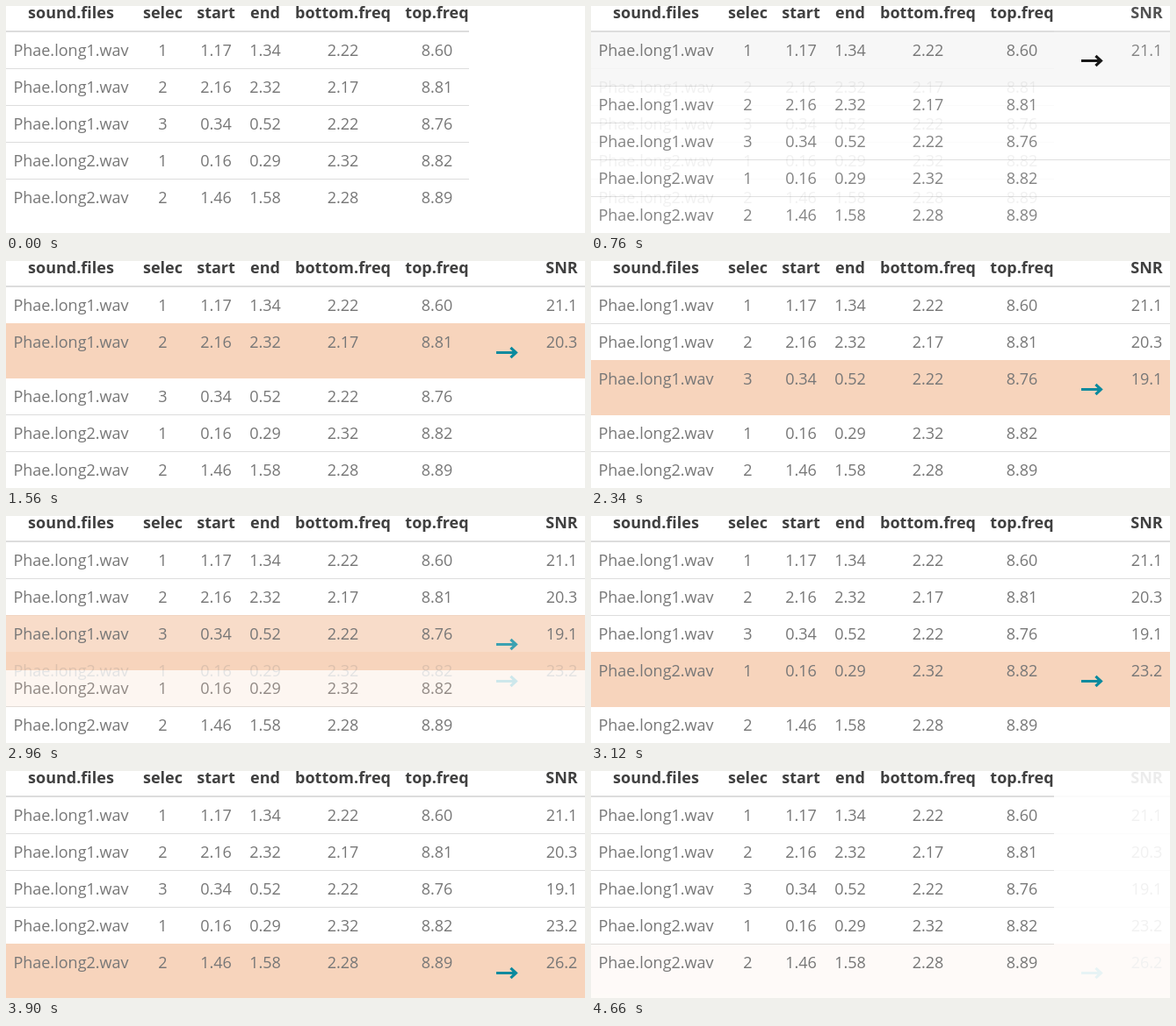
Recreate the animation shown at these times as an HTML page. Size 659 by 259 pixels, loop 4.68 s.

```html
<!DOCTYPE html>
<html lang="en">
<head>
<meta charset="utf-8">
<title>Signal-to-noise table</title>
<style>
  html, body { margin: 0; width: 100%; height: 100%; overflow: hidden; background: #fff; }
  svg { display: block; width: 659px; height: 259px; }
  text { font: 18px "Open Sans", sans-serif; fill: #777; text-anchor: middle; }
  .head { font-weight: 700; fill: #404040; }
</style>
</head>
<body>
<svg id="stage" viewBox="0 0 659 259"></svg>
<script>
const NS = "http://www.w3.org/2000/svg";
const W = 659, H = 259, NARROW = 527;
const TOP = 29, ROW = 42, EXTRA = 20;
const HOLD = 600, STEP = 20, STEPS = 10;
const SLOT = HOLD + STEP * (STEPS - 1);
const stage = document.getElementById("stage");

const columns = [74, 178.5, 239, 295, 383.5, 490.5];
const snrX = 632.5;
const heads = ["sound.files", "selec", "start", "end", "bottom.freq", "top.freq"];
const rows = [
  ["Phae.long1.wav", "1", "1.17", "1.34", "2.22", "8.60", "21.1"],
  ["Phae.long1.wav", "2", "2.16", "2.32", "2.17", "8.81", "20.3"],
  ["Phae.long1.wav", "3", "0.34", "0.52", "2.22", "8.76", "19.1"],
  ["Phae.long2.wav", "1", "0.16", "0.29", "2.32", "8.82", "23.2"],
  ["Phae.long2.wav", "2", "1.46", "1.58", "2.28", "8.89", "26.2"]
];

function add(parent, tag, attrs, content) {
  const node = document.createElementNS(NS, tag);
  for (const key in attrs) node.setAttribute(key, attrs[key]);
  if (content) node.textContent = content;
  return parent.appendChild(node);
}

function rect(parent, x, y, width, height, fill) {
  add(parent, "rect", { x, y, width, height, fill });
}

function arrow(parent, y, stroke) {
  add(parent, "path", {
    d: `M558 ${y}H580M574.4 ${y - 5.6}L580.4 ${y}L574.4 ${y + 5.6}`,
    fill: "none", stroke, "stroke-width": 3.2
  });
}

// active: 0 for the plain table, otherwise the row being measured
function buildTable(active) {
  const g = add(stage, "g", {});
  const width = active ? W : NARROW;
  const rowY = i => TOP + ROW * i + (active && i >= active ? EXTRA : 0);
  const first = active === 1;

  rect(g, 0, 0, W, H, "#fff");
  if (first) rect(g, 0, TOP, W, ROW + EXTRA, "#f7f7f7");
  rect(g, 0, 28, width, 2, "#ddd");
  for (let i = 1; i < rows.length; i++) rect(g, 0, rowY(i), width, 1, "#ddd");
  if (active > 1) rect(g, 0, rowY(active - 1), W, ROW + EXTRA + 1, "#f7d4bc");

  heads.forEach((label, c) => add(g, "text", { x: columns[c], y: 14, class: "head" }, label));
  if (active) add(g, "text", { x: snrX, y: 14, class: "head" }, "SNR");

  rows.forEach((cells, i) => {
    const y = rowY(i) + 28;
    columns.forEach((x, c) => add(g, "text", { x, y }, cells[c]));
    if (i < active) add(g, "text", { x: snrX, y }, cells[6]);
  });
  if (active) arrow(g, rowY(active - 1) + 33.5, first ? "#000" : "#0b8a9e");
  return g;
}

const layers = [0, 1, 2, 3, 4, 5, 0].map(buildTable);
const LOOP = SLOT * (layers.length - 1);

function draw(ms) {
  const t = ms % LOOP;
  const current = Math.floor(t / SLOT);
  const fade = t % SLOT - HOLD;
  const mix = fade < 0 ? 0 : (Math.floor(fade / STEP) + 1) / STEPS;
  layers.forEach((layer, i) => {
    layer.setAttribute("opacity", i <= current ? 1 : i === current + 1 ? mix : 0);
  });
}

const start = performance.now();
function tick() {
  draw(performance.now() - start);
  requestAnimationFrame(tick);
}
tick();
</script>
</body>
</html>
```
